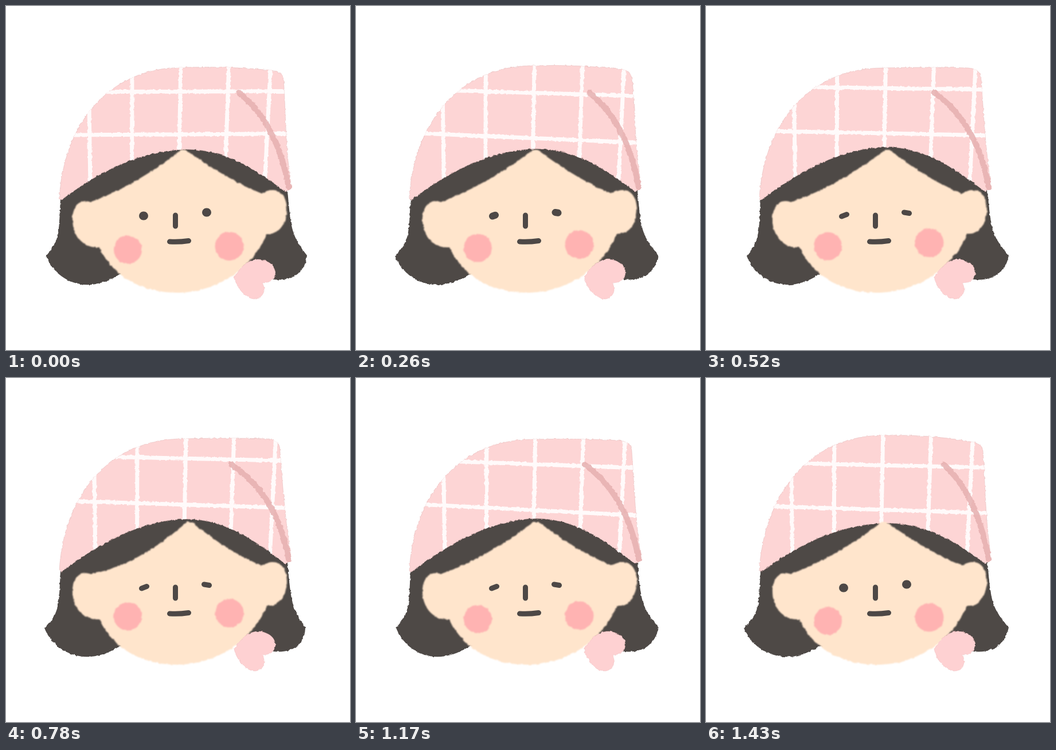
Write an HTML page that moves like this. It is 600 px wide and 600 px high and loops after 1560 ms.

```html
<!DOCTYPE html>
<html lang="en">
<head>
<meta charset="utf-8">
<title>Girl with a headscarf</title>
<style>
  html, body { margin: 0; height: 100%; overflow: hidden; background: #fff; }
  svg { display: block; width: 100vw; height: 100vh; }
  path { stroke-linecap: round; stroke-linejoin: round; }
  .line { fill: none; }
  .ink { fill: none; stroke: #4d4846; stroke-width: 9; }
</style>
</head>
<body>
<svg viewBox="0 0 600 600">
  <defs>
    <filter id="rough" filterUnits="userSpaceOnUse" x="0" y="0" width="600" height="600" color-interpolation-filters="sRGB">
      <feTurbulence type="fractalNoise" baseFrequency=".18" numOctaves="2"/>
      <feDisplacementMap in="SourceGraphic" scale="4" xChannelSelector="R" yChannelSelector="G"/>
    </filter>
    <filter id="soft" filterUnits="userSpaceOnUse" x="0" y="0" width="600" height="600" color-interpolation-filters="sRGB">
      <feTurbulence type="fractalNoise" baseFrequency=".14" numOctaves="2"/>
      <feDisplacementMap in="SourceGraphic" scale="4" xChannelSelector="R" yChannelSelector="G"/>
      <feGaussianBlur stdDeviation="1"/>
    </filter>
    <filter id="blur" filterUnits="userSpaceOnUse" x="0" y="0" width="600" height="600" color-interpolation-filters="sRGB">
      <feGaussianBlur stdDeviation=".7"/>
    </filter>
    <clipPath id="inside"><path id="clip"/></clipPath>
  </defs>
  <g filter="url(#rough)">
    <path id="hair" fill="#4e4946"/>
    <path id="scarf" fill="#fdd5d5" stroke="#e6bcbc" stroke-width=".6"/>
    <path id="grid" class="line" clip-path="url(#inside)" stroke="#fffafa" stroke-width="7"/>
    <path id="crease" class="line" stroke="#e5b0b0" stroke-opacity=".85" stroke-width="10"/>
  </g>
  <g filter="url(#soft)">
    <path id="face" fill="#ffe5cc"/>
    <circle id="cheekL" cx="212.5" r="24.5" fill="#ffb3b2"/>
    <circle id="cheekR" cx="389.5" r="25" fill="#ffb3b2"/>
  </g>
  <g filter="url(#rough)">
    <path fill="#fed1d2" stroke="#eebcbc" stroke-width=".5"
      d="M398 473C418 440 440 437 458 447C476 457 474 483 447 483C456 499 444 511 434 511C418 511 402 491 398 473Z"/>
  </g>
  <g class="ink" filter="url(#blur)">
    <path id="eyes"/>
    <path d="M295.5 365V384M285.5 411Q302 412 318.5 409.5"/>
  </g>
</svg>
<script>
const STEP = 130, LAST = 6;
const $ = id => document.getElementById(id);
const noise = document.querySelectorAll('feTurbulence');

// Hand-drawn wobble, one value per pose from awake to asleep
const wobble = {
  top: [107, 100, 104, 107, 108, 107, 106],
  brim: [250, 253, 249, 245, 246, 246, 246],
  tilt: [-2, 11, 15, 18, 7, 9, 11],
  fold: [406, 415, 407, 399, 398, 396, 393],
  tipL: [70, 66, 68, 70, 71, 69, 67],
  tipR: [525, 528, 528, 528, 528, 525, 522]
};

function gridPath(i, tilt) {
  const shift = 3 - 9 * (1 - i / LAST) ** 3;
  const rowA = 150 - 2.4 * i, rowB = 225 - 1.8 * i;
  let d = `M100 ${rowA}L500 ${rowA + .8 * tilt}M100 ${rowB}L500 ${rowB + 1.15 * tilt}`;
  [150, 226, 311, 395, 468].forEach((x, n) => {
    d += `M${x + shift} 95L${x + shift + 3 - 3.5 * n} 315`;
  });
  return d;
}

function draw(i) {
  const set = (id, d) => $(id).setAttribute('d', d);
  const [top, brim, tilt, fold, tipL, tipR] = Object.values(wobble).map(v => v[i]);

  const x = 482 - 1.1 * i, y = 112 - i; // back corner of the scarf
  const scarf = `M93 336C100 210 175 ${top} 310 ${top}Q390 ${top - 2} ${x - 20} ${y}
    Q${x} ${y + 2} ${x + 2} ${y + 15}C${x + 6} ${y + 70} 487 250 498 318L487 324
    C440 288 385 ${brim} 315 ${brim}C235 ${brim + 1} 160 290 97 338Z`;
  set('scarf', scarf);
  set('clip', scarf);
  set('grid', gridPath(i, tilt));
  set('crease', `M${fold} 151Q473 204 493 316`);

  set('hair', `M95 335C92 400 94 408 ${tipL} 436C${tipL + 15} 475 135 508 198 468
    L400 450L467 477C500 480 522 465 ${tipR} 435C498 400 497 390 491 322C470 200 120 230 95 335Z`);

  const apex = 309 + 1.8 * i, sag = 311 + 16 * (i / LAST) ** 4;
  set('face', `M163 421C103 425 103 326 148 342Q230 ${sag} ${apex - 4} 251H${apex + 4}
    Q388 304 446 327C503 295 503 402 455 397C430 460 365 500 298 500C235 500 185 470 163 421Z`);

  const blush = 425 - 1.5 * i;
  $('cheekL').setAttribute('cy', blush);
  $('cheekR').setAttribute('cy', blush - 6);

  const lid = Math.max(0, Math.min(1, (i - 1) / 2)), half = .5 + 4 * lid;
  set('eyes', `M${240 + lid - half} ${366 + lid}L${240 + lid + half} ${366 - 2.5 * lid}
    M${350 - half} 360L${350 + half} ${360 + 1.5 * lid}`);
  $('eyes').style.strokeWidth = 15 - 6 * lid;
  noise.forEach(n => n.setAttribute('seed', i + 1));
}

let shown = -1;
function tick() {
  const step = Math.floor(performance.now() / STEP) % (2 * LAST);
  const i = LAST - Math.abs(LAST - step); // there and back
  if (i !== shown) draw(shown = i);
  requestAnimationFrame(tick);
}
tick();
</script>
</body>
</html>
```
